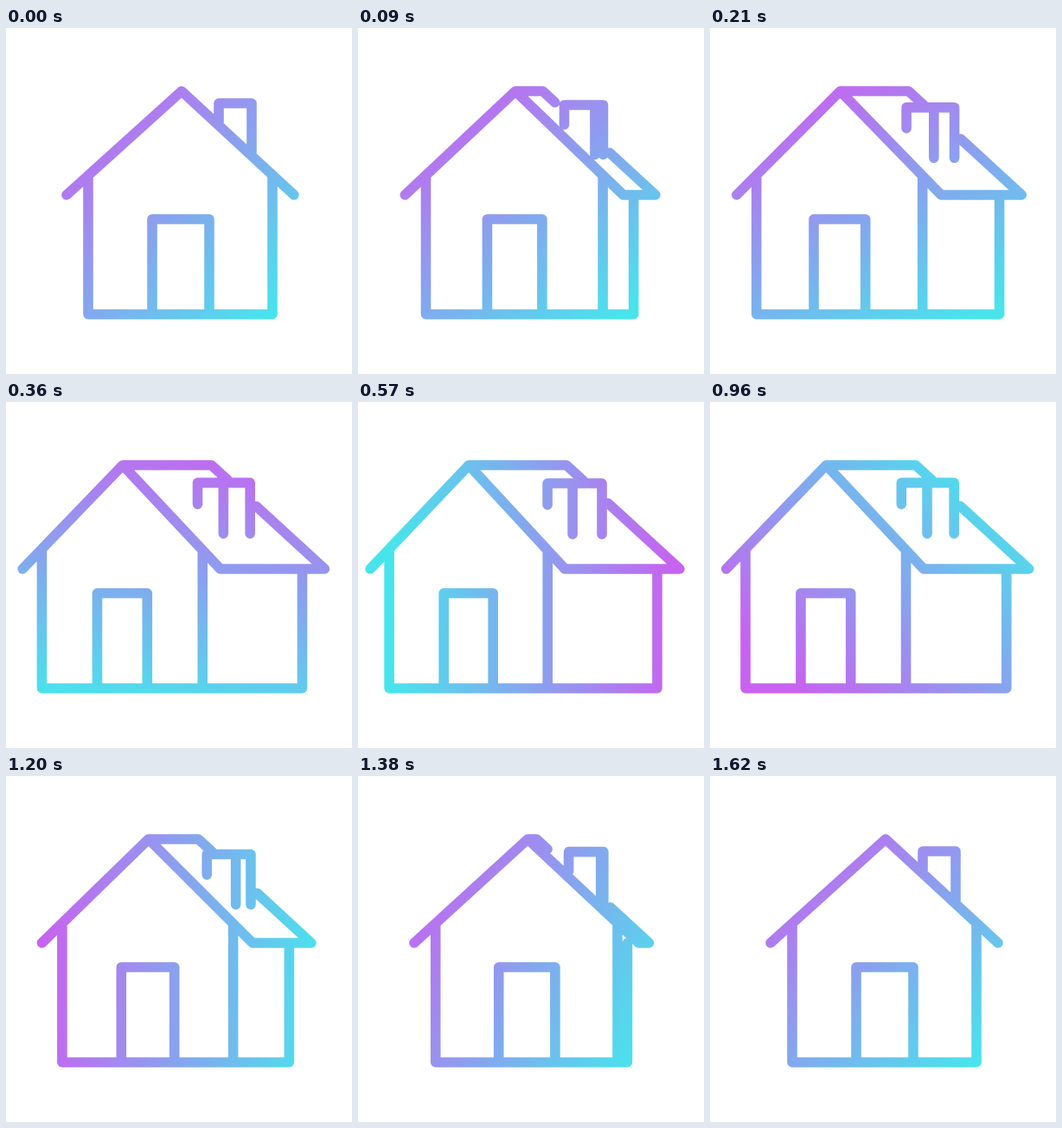
Write an HTML page that moves like this. It is 400 px wide and 400 px high and loops after 3.65 s.

```html
<!DOCTYPE html>
<html lang="en">
<head>
<meta charset="utf-8">
<title>House</title>
<style>
  html, body { margin: 0; width: 100%; height: 100%; overflow: hidden; background: #fff; }
  svg { display: block; width: 100%; height: 100%; }
</style>
</head>
<body>
<svg viewBox="0 0 400 400">
  <defs>
    <linearGradient id="ink" gradientUnits="userSpaceOnUse">
      <stop offset="0" stop-color="#c862f0"/>
      <stop offset="1" stop-color="#48e4ec"/>
    </linearGradient>
  </defs>
  <path id="house" fill="none" stroke="url(#ink)" stroke-width="11.6"
        stroke-linecap="round" stroke-linejoin="round"/>
</svg>
<script>
const LOOP = 3650, MOVE = 1620, STEP = 30;
const CENTER = 203, REACH = 165;

// [time, value]: turn goes from 0 (front view) to 1 (three-quarter view)
const TURN = [[0, 0], [90, .28], [210, .7], [330, .88], [450, .965], [600, 1], [780, .985],
  [960, .915], [1080, .785], [1200, .51], [1290, .29], [1380, .09], [1460, .01], [1530, 0], [1620, 0]];
// Gradient direction in degrees
const ANGLE = [[0, 45], [210, 62], [570, 180], [960, 313], [1200, 363], [1380, 388], [1620, 405]];

const house = document.getElementById('house');
const ink = document.getElementById('ink');

// Smooth curve through the keys without overshoot
function curve(keys) {
  const slope = keys.slice(1).map((k, i) => (k[1] - keys[i][1]) / (k[0] - keys[i][0]));
  const tangent = keys.map((k, i) => {
    const a = slope[i - 1], b = slope[i];
    if (a === undefined) return b;
    if (b === undefined) return a;
    return a * b > 0 ? 2 * a * b / (a + b) : 0;
  });
  return t => {
    let i = 0;
    while (i < keys.length - 2 && t >= keys[i + 1][0]) i++;
    const [t0, v0] = keys[i], [t1, v1] = keys[i + 1];
    const h = t1 - t0, u = (t - t0) / h, w = 1 - u;
    return v0 * w * w * (1 + 2 * u) + v1 * u * u * (3 - 2 * u)
      + h * u * w * (tangent[i] * w - tangent[i + 1] * u);
  };
}

const turnAt = curve(TURN), angleAt = curve(ANGLE);

const line = (...pts) => 'M' + pts.map(p => p.map(n => n.toFixed(2)).join(' ')).join('L');

function outline(p) {
  const mix = (a, b) => a + (b - a) * p;
  const top = 73, eave = 193, wall = 173, floor = 331, doorTop = 221;

  const apex = mix(203, 128), ridge = mix(203, 241);
  const eaveL = mix(70, 14), eaveM = mix(333, 239), eaveR = mix(333, 372);
  const wallL = mix(95, 36), wallM = mix(308, 219), wallR = mix(308, 346);
  const doorL = mix(169, 99), doorR = mix(235, 156);
  const pipeL = mix(246, 219), pipeM = mix(284, 248), pipeR = mix(284, 282);
  const pipeTop = mix(87, 94), pipeEnd = mix(144, 153);

  // The far roof edge is hidden behind the chimney
  const run = (eaveR - ridge) / (eave - top);
  const hideX = ridge + (pipeTop - 3 - top) * run;
  const showX = mix(292, 289);

  return [
    line([eaveL, eave], [apex, top], [eaveM, eave], [eaveR, eave],
      [showX, top + (showX - ridge) / run]),
    line([apex, top], [ridge, top], [hideX, pipeTop - 3]),
    line([wallL, wall], [wallL, floor], [wallR, floor], [wallR, eave]),
    line([wallM, wall], [wallM, floor]),
    line([doorL, floor], [doorL, doorTop], [doorR, doorTop], [doorR, floor]),
    line([pipeL, mix(109, 119)], [pipeL, pipeTop], [pipeR, pipeTop], [pipeR, pipeEnd]),
    line([pipeM, pipeTop], [pipeM, pipeEnd])
  ].join('');
}

function draw(t) {
  const a = angleAt(t) * Math.PI / 180;
  const dx = REACH * Math.cos(a), dy = REACH * Math.sin(a);
  const ends = { x1: CENTER - dx, y1: CENTER - dy, x2: CENTER + dx, y2: CENTER + dy };
  for (const key in ends) ink.setAttribute(key, ends[key]);
  house.setAttribute('d', outline(turnAt(t)));
}

function tick() {
  const t = performance.now() % LOOP;
  draw(Math.min(MOVE, Math.floor(t / STEP) * STEP));
  requestAnimationFrame(tick);
}
tick();
</script>
</body>
</html>
```
